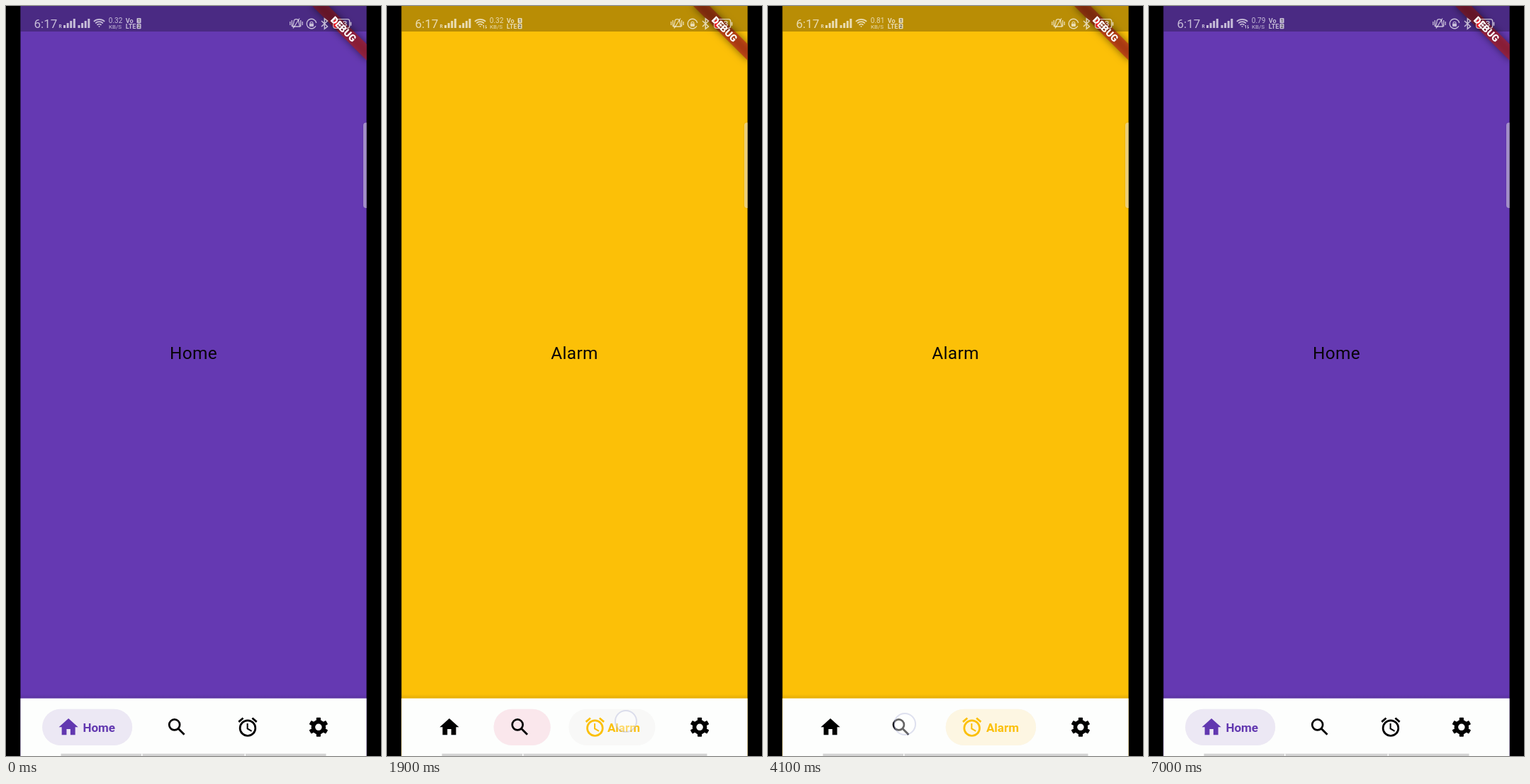
An HTML page with a canvas that plays this animation: 529x1058 px, repeating every 7.2 s.

```html
<!DOCTYPE html>
<html lang="en">
<head>
<meta charset="utf-8">
<title>Bottom navigation</title>
<style>
html, body { margin: 0; width: 100%; height: 100%; overflow: hidden; background: #000; }
canvas { display: block; width: 100vw; height: 100vh; }
</style>
</head>
<body>
<canvas id="stage"></canvas>
<script>
const W = 529, H = 1058, LOOP = 7200, TAU = Math.PI * 2;
const LEFT = 20.25, RIGHT = W - LEFT, WIDE = RIGHT - LEFT;
const NAV_TOP = 976.7, NAV_MID = 1017.3, STATUS_H = 36;
const UNIT = 1.356; // device pixels per layout unit
const STATUS = 'rgba(255,255,255,.69)', NAV = '#fdfefd';

const canvas = document.getElementById('stage');
const ctx = canvas.getContext('2d');
const dpr = window.devicePixelRatio || 1;
canvas.width = W * dpr;
canvas.height = H * dpr;

const clamp = v => Math.max(0, Math.min(1, v));
const easeOut = u => 1 - (1 - u) ** 3;

function rect(color, x, y, w, h) {
  ctx.fillStyle = color;
  ctx.fillRect(x, y, w, h);
}

function round(color, x, y, w, h, r) {
  ctx.fillStyle = color;
  ctx.beginPath();
  ctx.roundRect(x, y, w, h, r);
  ctx.fill();
}

function text(str, x, y, font, color, align = 'left', spacing = 0) {
  ctx.font = font + ' Roboto, sans-serif';
  ctx.letterSpacing = spacing + 'px';
  ctx.fillStyle = color;
  ctx.textAlign = align;
  ctx.fillText(str, x, y);
}

function line(width, ...points) {
  ctx.lineWidth = width;
  ctx.beginPath();
  for (const [x, y] of points) ctx.lineTo(x, y);
  ctx.stroke();
}

function arc(width, x, y, r, from = 0, to = TAU) {
  ctx.lineWidth = width;
  ctx.beginPath();
  ctx.arc(x, y, r, from, to);
  ctx.stroke();
}

// Icons are drawn on a 24-unit grid
function homeIcon() {
  ctx.beginPath();
  ctx.moveTo(2, 12);
  ctx.lineTo(12, 3);
  ctx.lineTo(22, 12);
  ctx.rect(5, 12, 14, 2);
  ctx.rect(5, 14, 5, 6);
  ctx.rect(14, 14, 5, 6);
  ctx.fill();
}

function searchIcon() {
  arc(2, 9.5, 9.5, 5.5);
  line(2.1, [13.6, 13.6], [19.7, 19.7]);
}

function alarmIcon() {
  arc(2, 12, 13, 8);
  line(1.5, [11.75, 8], [11.75, 13.6], [16.1, 16.2]);
  for (const side of [-1, 1]) line(2, [12 + side * 4.75, 2.6], [12 + side * 9.35, 6.5]);
}

function settingsIcon() {
  arc(4.1, 12, 12, 5.55);
  ctx.translate(12, 12);
  for (let i = 0; i < 6; i++) {
    ctx.rotate(TAU / 6);
    ctx.beginPath();
    ctx.roundRect(-2.25, -10, 4.5, 4.2, .6);
    ctx.fill();
  }
}

// grow: extra pill width when the label is open
const tabs = [
  { name: 'Home', page: '#6539b2', ink: '#6238b0', tint: '#ece8f4', grow: 53, icon: homeIcon },
  { name: 'Search', page: '#e71e5d', ink: '#dd1d5b', tint: '#fbe6ec', grow: 61.5, icon: searchIcon },
  { name: 'Alarm', page: '#fcc007', ink: '#fbc00a', tint: '#fdf6e2', grow: 53.5, icon: alarmIcon },
  { name: 'Settings', page: '#019685', ink: '#049485', tint: '#e0f2f0', grow: 72.5, icon: settingsIcon }
];

const taps = [
  { at: 1100, tab: 1, x: 241, y: 1013 },
  { at: 1800, tab: 2, x: 337, y: 1009 },
  { at: 2600, tab: 3, x: 441, y: 1014 },
  { at: 3500, tab: 2, x: 274, y: 1015 },
  { at: 4200, tab: 1, x: 193, y: 1013 },
  { at: 5700, tab: 0, x: 91, y: 1020 }
];

function navState(t) {
  let state = { now: 0, prev: -1, dt: LOOP };
  for (const { at, tab } of taps)
    if (t >= at) state = { now: tab, prev: state.now, dt: t - at };
  return state;
}

function inBanner(paint) {
  ctx.save();
  ctx.translate(RIGHT, 0);
  ctx.rotate(TAU / 8);
  paint(28 * UNIT, 80 * UNIT, 12 * UNIT);
  ctx.restore();
}

function drawRibbon() {
  inBanner((y, w, h) => {
    ctx.shadowColor = 'rgba(0,0,0,.5)';
    ctx.shadowBlur = 10.8 * dpr;
    // the shadow's caster sits off stage
    const far = 3000;
    ctx.shadowOffsetX = far * dpr;
    rect('#000', -w / 2 - far * Math.SQRT1_2, y + far * Math.SQRT1_2, w, h);
    ctx.shadowColor = 'transparent';
    rect('rgba(183,28,28,.627)', -w / 2, y, w, h);
  });
}

function drawRibbonLabel() {
  inBanner((y, w, h) => text('DEBUG', 0, y + h / 2 + 4.9, '900 13.8px', '#fff', 'center'));
}

function drawSignal(x) {
  for (let i = 0; i < 4; i++) {
    const h = 4 + i * 3;
    rect(STATUS, x + i * 4.6, 31 - h, 3, h);
  }
}

function drawWifi(active) {
  for (let r = 1; r < 12; r += 3.4) arc(1.7, 131.5, 30, r, TAU * .63, TAU * .87);
  if (!active) return;
  line(1, [136.5, 31.5], [136.5, 27], [135, 28.5]);
  line(1, [139.5, 27], [139.5, 31.5], [141, 30]);
}

function drawMutedBell(x, y) {
  arc(1.3, x, y - 2.5, 3.4, TAU / 2, TAU);
  line(1.3, [x - 3.4, y - 2.5], [x - 5, y + 4.5], [x + 5, y + 4.5], [x + 3.4, y - 2.5]);
  line(1.3, [x - 4.5, y + 7], [x + 4.5, y - 7]);
  for (const side of [-1, 1])
    for (const [dx, h] of [[6.2, 4.5], [8.7, 2.5]])
      line(1.3, [x + side * dx, y - h], [x + side * dx, y + h]);
}

function drawRotationLock(x, y) {
  arc(1.4, x, y, 6.8, .5, TAU - .15);
  round(STATUS, x - 3, y - .5, 6, 4.5, .8);
  arc(1.1, x, y - .8, 2, TAU / 2, TAU);
}

function drawBluetooth(x, y) {
  line(1.5, [x - 4.3, y - 4], [x + 4.2, y + 4], [x, y + 7.2], [x, y - 7.2], [x + 4.2, y - 4], [x - 4.3, y + 4]);
}

function drawBattery(x, y) {
  ctx.lineWidth = 1.3;
  ctx.beginPath();
  ctx.roundRect(x, y, 23, 12.6, 3);
  ctx.stroke();
  rect(STATUS, x + 24, y + 4, 1.6, 5);
  round('rgba(250,25,35,.9)', x + .7, y + .7, 5, 11.2, 2);
  text('23', x + 13, y + 10.5, 'bold 11.5px', STATUS, 'center');
}

function drawStatus(t) {
  rect('rgba(0,0,0,.265)', LEFT, 0, WIDE, STATUS_H);
  ctx.strokeStyle = STATUS;
  text('6:17', 39.5, 31, '17px', STATUS);
  text('R', 74.5, 31, 'bold 6.5px', STATUS);
  drawSignal(81);
  drawSignal(101.5);
  drawWifi((t >= 400 && t < 4000) || t >= 5700);

  const rate = t < 2900 ? '0.32' : t < 7000 ? '0.81' : '0.79';
  text(rate, 144.8, 24.2, '10px', STATUS);
  text('KB/S', 145, 31.8, '8px', STATUS);
  ['Vo', 'LTE'].forEach((word, i) => {
    const y = 24 + i * 8;
    text(word, 168.8, y, 'bold 9px', STATUS);
    round(STATUS, 184.5, y - 7, 6, 7.2, 1);
    text(i + 1, 187.5, y - .9, 'bold 6.5px', 'rgba(0,0,0,.6)', 'center');
  });

  drawMutedBell(409.5, 24.5);
  drawRotationLock(431, 25);
  drawBluetooth(449.3, 25);
  drawBattery(461.7, 18.7);
}

function drawHandle() {
  ctx.save();
  ctx.shadowColor = 'rgba(0,0,0,.3)';
  ctx.shadowBlur = 2 * dpr;
  round('rgba(255,255,255,.45)', 504, 164.5, 8, 120.5, 4);
  ctx.restore();
}

function drawTab(tab, x, w, open, active, dt) {
  const cx = x + 37;
  const fade = clamp(dt / 350) ** 2;
  const tint = active ? fade : 1 - fade;

  // pills pass through pale grey while they fade
  ctx.globalAlpha = active ? 1 : tint;
  round('#f7f7f8', x, 991.7, w, 51.3, 25.6);
  ctx.globalAlpha = tint;
  round(tab.tint, x, 991.7, w, 51.3, 25.6);

  ctx.globalAlpha = clamp(active ? dt / 100 : 1 - dt / 80);
  ctx.save();
  ctx.beginPath();
  ctx.rect(cx + 14, 990, x + w - cx - 14, 54);
  ctx.clip();
  text(tab.name, cx + 16.5 + tab.grow * open / 2, 1024, 'bold 17px', tab.ink, 'center');
  ctx.restore();
  ctx.globalAlpha = 1;
}

function drawIcon(tab, cx, color) {
  ctx.save();
  ctx.translate(cx - 12 * UNIT, NAV_MID - 12 * UNIT);
  ctx.scale(UNIT, UNIT);
  ctx.fillStyle = ctx.strokeStyle = color;
  tab.icon();
  ctx.restore();
}

function drawNav({ now, prev, dt }) {
  const shade = ctx.createLinearGradient(0, NAV_TOP - 6, 0, NAV_TOP);
  shade.addColorStop(0, 'rgba(0,0,0,0)');
  shade.addColorStop(1, 'rgba(0,0,0,.1)');
  rect(shade, LEFT, NAV_TOP - 6, WIDE, 6);
  rect(NAV, LEFT, NAV_TOP, WIDE, H - NAV_TOP);

  const p = easeOut(clamp(dt / 187));
  const open = tabs.map((_, i) => i === now ? p : i === prev ? 1 - p : 0);
  const widths = tabs.map((tab, i) => 74 + tab.grow * open[i]);
  const gap = (WIDE - 10 - widths.reduce((a, b) => a + b)) / 5;
  let x = LEFT + 5 + gap;
  tabs.forEach((tab, i) => {
    const active = i === now;
    if (active || i === prev) drawTab(tab, x, widths[i], open[i], active, dt);
    drawIcon(tab, x + 37, active ? tab.ink : '#000');
    x += widths[i] + gap;
  });

  rect('#d3d3d3', 77.5, 1054.7, 374, 3.3);
  rect(NAV, 191, 1054.7, 1.5, 3.3);
  if (now % 3 === 0) rect(NAV, 336.5, 1054.7, 1.5, 3.3);
}

function drawTouch(t) {
  for (const { at, x, y } of taps) {
    if (t < at - 150 || t >= at + 120) continue;
    ctx.beginPath();
    ctx.arc(x, y, 15, 0, TAU);
    ctx.fillStyle = 'rgba(255,255,255,.4)';
    ctx.fill();
    ctx.strokeStyle = 'rgba(160,165,210,.35)';
    ctx.lineWidth = 2;
    ctx.stroke();
  }
}

function draw(t) {
  const state = navState(t);
  const tab = tabs[state.now];
  ctx.setTransform(dpr, 0, 0, dpr, 0, 0);
  rect('#000', 0, 0, W, H);
  ctx.save();
  ctx.beginPath();
  ctx.rect(LEFT, 0, WIDE, H);
  ctx.clip();
  rect(tab.page, LEFT, 0, WIDE, H);
  text(tab.name, W / 2, 498, '24.4px', '#080508', 'center', .25 * UNIT);
  drawNav(state);
  drawRibbon();
  drawStatus(t);
  drawRibbonLabel();
  drawHandle();
  drawTouch(t);
  ctx.restore();
}

let start;
function tick(now) {
  start ??= now;
  draw((now - start) % LOOP);
  requestAnimationFrame(tick);
}
requestAnimationFrame(tick);
</script>
</body>
</html>
```
